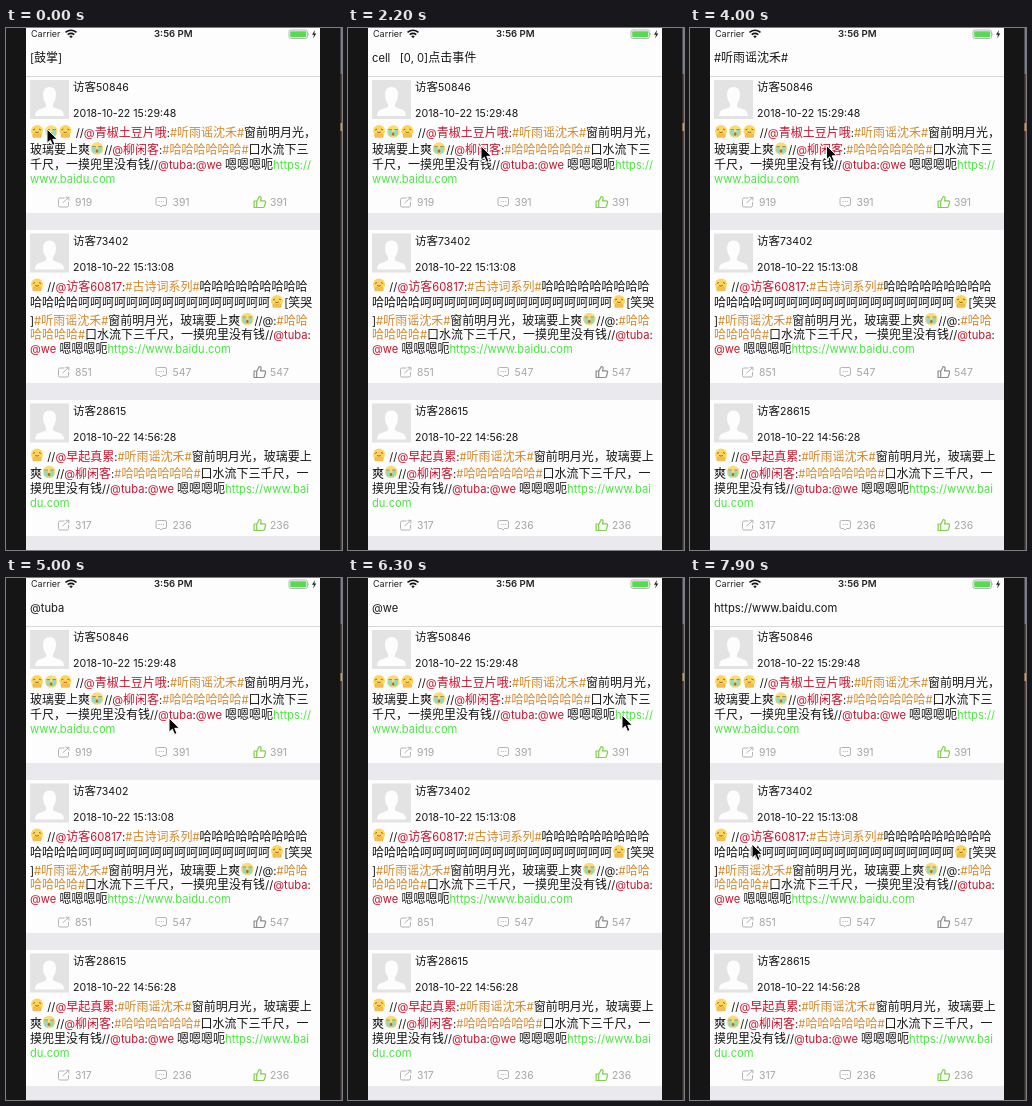
Write an HTML page that moves like this. It is 336 px wide and 522 px high and loops after 8 s.

```html
<!DOCTYPE html>
<html lang="zh-CN">
<head>
<meta charset="utf-8">
<style>
html, body { margin: 0; width: 100%; height: 100%; overflow: hidden; background: #151516; }
svg { display: block; width: 336px; height: 522px; font-family: Inter, "Noto Sans CJK SC", "Noto Sans CJK", sans-serif; }
text { white-space: pre; }
</style>
</head>
<body>
<svg id="stage" viewBox="0 0 336 522">
  <defs>
    <g id="clap">
      <circle r="6" cy="-.5" fill="#ffd65c"/>
      <path d="M-4-1.500l2-1M2-2.500l2 1M-1.800 .4q1.800 1.600 3.600 0" fill="none" stroke="#8a5a20" stroke-width=".9"/>
      <path d="M-4 5.800q-1-2.800 1.500-3.800l2.500 1.400 2.500-1.400q2.500 1 1.500 3.800z" fill="#fbc04a" stroke="#d99a3c" stroke-width=".5"/>
    </g>
    <g id="cry">
      <circle r="6.300" fill="#f9dc74"/>
      <path d="M-4.800-1.600h3.600v6.800q-2.400-.4-3.600-2zM1.200-1.600h3.600v4.800q-1.200 1.600-3.600 2z" fill="#8fdcc6"/>
      <path d="M-4.800-2h3.600M1.200-2h3.600" stroke="#a07a3a" stroke-width=".8"/>
      <ellipse cy="2.600" rx="1.300" ry="1.800" fill="#a9713a"/>
    </g>
    <g id="avatar">
      <rect width="39" height="39" fill="#e3e3e4"/>
      <path d="M5 36q0-6 6-7l5-2v-3q-3-4-3-9 0-8 6.500-8t6.500 8q0 5-3 9v3l5 2q6 1 6 7z" fill="#fdfdfe"/>
    </g>
    <g id="share" fill="none">
      <path d="M6-4H1.500Q0-4 0-2.500v6Q0 5 1.500 5h7Q10 5 10 3.500V0M4 1l6.200-5.500M7-4.700h3.400v3.300"/>
    </g>
    <g id="comment" fill="none">
      <path d="M1.500-4.500h7.500q1.500 0 1.500 1.500v5q0 1.500-1.500 1.500H6.500L5 5 3.500 3.500h-2Q0 3.500 0 2v-5q0-1.500 1.500-1.500zM2.700-.5h1M4.800-.5h1M6.900-.5h1"/>
    </g>
    <g id="like" fill="none" stroke-width="1.200" stroke-linejoin="round">
      <path d="M.6-1h2.600v6.500H.6zM3.200-.6L5.700-5.500q2.300 0 1.800 2.300L7-1.200h4q1.300.2 1 1.700l-1 3.800q-.3 1.200-1.500 1.200H3.200"/>
    </g>
  </defs>
  <rect x="20" width="294" height="522" fill="#fdfdfe"/>
  <g id="desktop">
    <rect x="334.500" width="1.500" height="46" fill="#777c98"/>
    <rect x="334.500" y="46" width="1.500" height="476" fill="#5c4238"/>
    <rect x="334.500" y="95" width="1.500" height="8" fill="#d99a4a"/>
  </g>
  <g id="bar" fill="#222">
    <text x="25" y="9.300" font-size="9">Carrier</text>
    <text x="148" y="9.300" font-size="9.600" font-weight="600">3:56 PM</text>
    <g fill="none" stroke="#111" stroke-width="1.600">
      <path d="M59.500 4.400q5.500-4.400 11 0M61.700 6.700q3.300-2.600 6.600 0"/>
    </g>
    <path d="M63.200 8.200q1.800-1.400 3.600 0L65 10.200z"/>
    <rect x="283" y="2" width="18.500" height="8.500" rx="2" fill="none" stroke="#9a9a9c" stroke-width=".7"/>
    <rect x="284.200" y="3.200" width="16.100" height="6.100" rx="1" fill="#55dc50"/>
    <path d="M302.500 4.800q1.300 1.400 0 2.900z" fill="#9a9a9c"/>
    <path d="M309 2l-3 4.800h2l-.9 3.700 3.200-5h-2z"/>
  </g>
  <path d="M20 48.500h294" stroke="#d8d8da"/>
  <g id="title"></g>
  <g id="cells"></g>
  <path id="cursor" d="M0 0v14.300l3.300-3.100 2.300 5.200 2.400-1-2.200-5.100h4.700z" fill="#050505" stroke="#fdfdfe" stroke-width="1" stroke-linejoin="round"/>
</svg>
<script>
const NS = 'http://www.w3.org/2000/svg';
const INK = '#161616', PERSON = '#c8142c', TOPIC = '#d58a2c', LINK = '#4be640';
const GREY = '#a6a6a6', LIKED = '#7ed04a';
const LOOP = 8000, STEP = 100;
const $ = id => document.getElementById(id);

function add(parent, tag, attrs, content) {
  const node = document.createElementNS(NS, tag);
  for (const key in attrs) node.setAttribute(key, attrs[key]);
  if (content) node.textContent = content;
  parent.appendChild(node);
  return node;
}

// Latin is set slightly smaller than Chinese.
function write(parent, x, y, content, fill = INK, size = 12, latin = 11.2) {
  const text = add(parent, 'text', { x, y, fill });
  for (const run of content.match(/[\x20-\x7e]+|[^\x20-\x7e]+/g)) {
    add(text, 'tspan', { 'font-size': run.charCodeAt(0) < 127 ? latin : size }, run);
  }
  return text.getComputedTextLength();
}

// ^ is the clapping face, ~ the crying face.
const TOKEN = /[\^~]|https:\/\/\S*|www\.\S+|^du\.com|@[\w\u4e00-\u9fa5]+|^哈+#|#[^#]+#?|[\s\S]/g;

function colorOf(token) {
  if (/^(https|www|du\.)/.test(token)) return LINK;
  if (/^@./.test(token)) return PERSON;
  return /#/.test(token) ? TOPIC : INK;
}

function richLine(parent, y, line) {
  const runs = [];
  for (const token of line.match(TOKEN)) {
    const color = colorOf(token), last = runs[runs.length - 1];
    if (token === '^' || token === '~') runs.push({ face: token });
    else if (last && last.color === color && color === INK) last.text += token;
    else runs.push({ text: token, color });
  }
  let x = 24;
  for (const run of runs) {
    if (run.face) {
      add(parent, 'use', { href: run.face === '^' ? '#clap' : '#cry', x: x + 7, y: y - 5.5 });
      x += 14.2;
    } else x += write(parent, x, y, run.text, run.color);
  }
}

const posts = [
  { top: 48, name: '访客50846', date: '2018-10-22 15:29:48', rows: [61, 78, 93, 107], foot: 126, counts: [919, 391, 391], liked: true,
    lines: ['^~^ //@青椒土豆片哦:#听雨谣沈禾#窗前明月光，', '玻璃要上爽~//@柳闲客:#哈哈哈哈哈哈#口水流下三',
      '千尺，一摸兜里没有钱//@tuba:@we 嗯嗯嗯呃https://', 'www.baidu.com'] },
  { top: 201.5, name: '访客73402', date: '2018-10-22 15:13:08', rows: [61, 77.5, 95, 109, 123.5], foot: 142.5, counts: [851, 547, 547],
    lines: ['^ //@访客60817:#古诗词系列#' + '哈'.repeat(9), '哈'.repeat(4) + '呵'.repeat(16) + '^[笑哭',
      ']#听雨谣沈禾#窗前明月光，玻璃要上爽~//@:#哈哈', '哈哈哈哈#口水流下三千尺，一摸兜里没有钱//@tuba:',
      '@we 嗯嗯嗯呃https://www.baidu.com'] },
  { top: 371.5, name: '访客28615', date: '2018-10-22 14:56:28', rows: [61, 78, 93, 107], foot: 125.5, counts: [317, 236, 236], liked: true,
    lines: ['^ //@早起真累:#听雨谣沈禾#窗前明月光，玻璃要上', '爽~//@柳闲客:#哈哈哈哈哈哈#口水流下三千尺，一',
      '摸兜里没有钱//@tuba:@we 嗯嗯嗯呃https://www.bai', 'du.com'] }
];

function drawPost(post) {
  const g = add($('cells'), 'g', { transform: `translate(0 ${post.top})` });
  add(g, 'use', { href: '#avatar', x: 24, y: 4 });
  write(g, 67, 15, post.name, INK, 11.5, 10.6);
  write(g, 67, 41, post.date, INK, 11.5, 10.6);
  post.lines.forEach((line, i) => richLine(g, post.rows[i], line));
  ['share', 'comment', 'like'].forEach((icon, i) => {
    const x = 52.5 + i * 97.5;
    const stroke = icon !== 'like' ? '#b4b4b4' : post.liked ? LIKED : '#8c8c8c';
    add(g, 'use', { href: '#' + icon, x, y: post.foot, stroke });
    write(g, x + 16.5, post.foot + 3.7, String(post.counts[i]), GREY, 11, 10.4);
  });
  add(g, 'rect', { x: 20, y: post.foot + 11, width: 294, height: 17, fill: '#eaeaee' });
}
posts.forEach(drawPost);

const titles = [
  [0, '[鼓掌]'], [900, '[哭]'], [1800, 'cell   [0, 0]点击事件'], [2800, '@青椒土豆片哦'],
  [3600, '#听雨谣沈禾#'], [4100, '@柳闲客'], [4700, '@tuba'], [5600, '@we'], [6600, 'https://www.baidu.com']
];
const path = [
  [0, 41, 101], [500, 41, 101], [800, 52, 101], [1200, 52, 101], [1600, 72, 110], [2200, 133, 118],
  [2700, 120, 103], [2900, 120, 103], [3200, 166, 104], [3700, 182, 104], [4100, 128, 120],
  [4300, 128, 120], [4700, 163, 140], [5000, 163, 140], [5500, 204, 137], [5700, 204, 137],
  [6200, 274, 137], [6900, 274, 137], [7700, 62, 266], [LOOP, 62, 266]
];

function cursorAt(t) {
  const i = path.findIndex(p => p[0] > t);
  const [t0, x0, y0] = path[i - 1], [t1, x1, y1] = path[i];
  const u = (t - t0) / (t1 - t0), k = u * u * (3 - 2 * u);
  return [x0 + (x1 - x0) * k, y0 + (y1 - y0) * k];
}

let shown = '';
function render(ms) {
  const t = Math.floor(ms % LOOP / STEP) * STEP;
  const title = titles.filter(entry => entry[0] <= t).pop()[1];
  if (title !== shown) {
    $('title').replaceChildren();
    write($('title'), 24, 34, title);
    shown = title;
  }
  $('cursor').setAttribute('transform', `translate(${cursorAt(t)})`);
}

const start = performance.now();
function tick() {
  render(performance.now() - start);
  requestAnimationFrame(tick);
}
tick();
</script>
</body>
</html>
```
